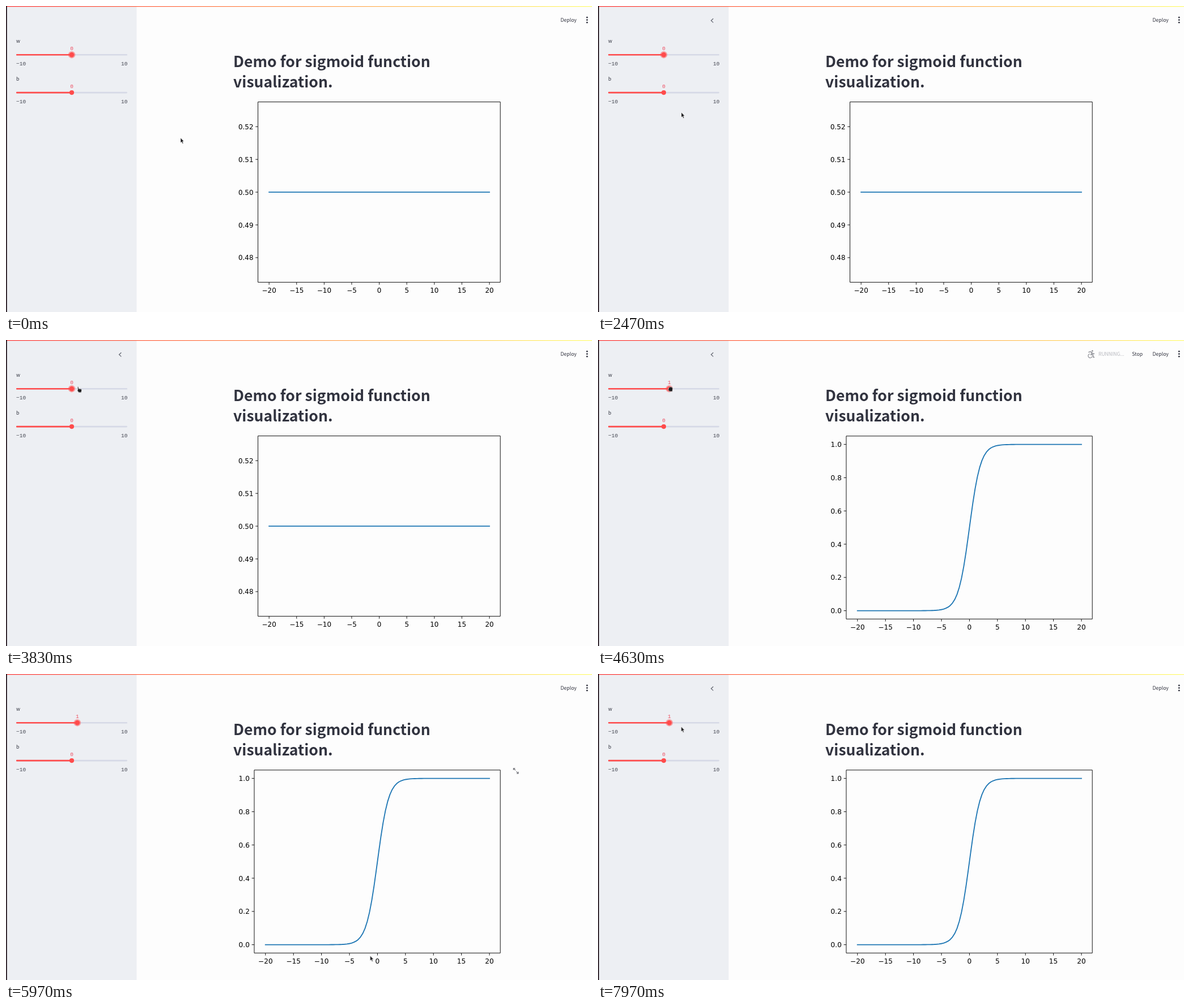
These frames come from a looping animation (1034 by 541 pixels, 8000 ms). An HTML page:

```html
<!DOCTYPE html>
<html lang="en">
<head>
<meta charset="utf-8">
<title>Sigmoid demo</title>
<style>
html, body { margin: 0; width: 100%; height: 100%; overflow: hidden; background: #fdfdfd; }
svg { display: block; width: 100%; height: 100%; }
.ui { font: 8.7px "Noto Sans CJK SC", "Noto Sans CJK JP", "Open Sans", sans-serif; fill: #31333f; }
.title { font-size: 26.6px; font-weight: 700; }
.mono { font: 9.5px "Liberation Mono", monospace; fill: #42444f; }
.value { fill: #ee4c60; text-anchor: middle; }
.plot { font: 12px "DejaVu Sans", sans-serif; fill: #000; }
.plot path { fill: none; stroke: #111; stroke-width: 1; }
.plot .curve { stroke: #1f77b4; stroke-width: 1.85; stroke-linecap: square; stroke-linejoin: round; }

.step, .move, .fade { animation: 8s linear infinite; }
.step { animation-timing-function: step-end; }
.w0 { animation-name: w0; }
.w1 { animation-name: w1; }
.bar { animation-name: bar; }
.thumb { animation-name: thumb; }
.flat { animation-name: flat; }
.sigmoid { animation-name: sigmoid; }
.running { animation-name: running; }
.chevron { animation-name: chevron; }
.arrow { animation-name: arrow; }
.hand { animation-name: hand; }
.grab { animation-name: grab; }
.expand { animation-name: expand; }
.pointer { animation-name: pointer; }

@keyframes w0 { 0% { opacity: 1 } 50.6%, 100% { opacity: 0 } }
@keyframes w1 { 0% { opacity: 0 } 50.6%, 100% { opacity: 1 } }
@keyframes bar { 0% { width: 98px } 50.6%, 100% { width: 107.8px } }
@keyframes thumb { 0% { transform: none } 50.6%, 100% { transform: translateX(9.8px) } }
@keyframes flat { 0% { opacity: 1 } 55.6%, 100% { opacity: 0 } }
@keyframes sigmoid { 0% { opacity: 0 } 55.6%, 100% { opacity: 1 } }
@keyframes running { 0% { opacity: 0 } 55% { opacity: 1 } 62%, 100% { opacity: 0 } }
@keyframes chevron { 0% { opacity: 0 } 26% { opacity: 1 } 66.5% { opacity: 0 } 82.3%, 100% { opacity: 1 } }
@keyframes arrow { 0% { opacity: 1 } 41% { opacity: 0 } 64.3%, 100% { opacity: 1 } }
@keyframes hand { 0% { opacity: 0 } 41% { opacity: 1 } 50.6%, 100% { opacity: 0 } }
@keyframes grab { 0% { opacity: 0 } 50.6% { opacity: 1 } 64.3%, 100% { opacity: 0 } }
@keyframes expand { 0%, 69.5% { opacity: 0 } 72.8%, 83.8% { opacity: 1 } 87%, 100% { opacity: 0 } }
@keyframes pointer {
  0%, 22% { transform: translate(308px, 233px); animation-timing-function: ease-in-out }
  30%, 32% { transform: translate(147px, 188px); animation-timing-function: ease-in-out }
  43%, 63.5% { transform: translate(127px, 82.5px); animation-timing-function: ease-in-out }
  72%, 78.5% { transform: translate(642.5px, 498px); animation-timing-function: ease-in-out }
  83.5% { transform: translate(158px, 122px); animation-timing-function: ease-out }
  90%, 100% { transform: translate(146.7px, 93px) }
}
</style>
</head>
<body>
<svg viewBox="0 0 1034 541">
  <defs>
    <linearGradient id="deco">
      <stop offset="0" stop-color="#ff4b4b"/>
      <stop offset="1" stop-color="#fffd80"/>
    </linearGradient>
  </defs>
  <rect width="1034" height="541" fill="#fdfdfd"/>
  <rect width="230.5" height="541" fill="#edeff3"/>
  <rect width="1034" height="1.4" fill="url(#deco)"/>
  <rect width="1.7" height="541" fill="#1c1018"/>

  <g class="ui">
    <text x="18" y="65">w</text>
    <text x="18" y="131.8">b</text>
    <text x="978.5" y="28">Deploy</text>
    <text class="title" x="401" y="107.5">Demo for sigmoid function</text>
    <text class="title" x="401" y="143.7">visualization.</text>
  </g>
  <g fill="#31333f">
    <circle cx="1025.3" cy="20.2" r="1.4"/>
    <circle cx="1025.3" cy="24.7" r="1.4"/>
    <circle cx="1025.3" cy="29.2" r="1.4"/>
  </g>
  <path class="step chevron" d="M203.4 22.2L199.6 25.8L203.4 29.4" fill="none" stroke="#666974" stroke-width="1.3"/>

  <g class="step running">
    <g fill="none" stroke="#8f9097" stroke-width="1.5" stroke-linecap="round" stroke-linejoin="round">
      <circle cx="872.3" cy="19.3" r="1.4" fill="#8f9097" stroke="none"/>
      <path d="M866 21.5L868.8 20.6L871.6 22.4L869.6 26H873.2L874 30.5H875.6M871.6 22.4L873 24.2H875.5"/>
      <path d="M867.3 24.6A3.6 3.6 0 1 0 871.9 29.2" stroke-width="1.2"/>
    </g>
    <g class="ui">
      <text x="883" y="28" style="font-size:8.5px;fill:#b5b6bc">RUNNING...</text>
      <text x="942.3" y="28">Stop</text>
    </g>
  </g>

  <g class="mono">
    <text x="18" y="105">−10</text>
    <text x="214.4" y="105" text-anchor="end">10</text>
    <text x="18" y="171.9">−10</text>
    <text x="214.4" y="171.9" text-anchor="end">10</text>
    <text class="value step w0" x="116" y="78.4">0</text>
    <text class="value step w1" x="125.8" y="78.4">1</text>
    <text class="value" x="116" y="145.3">0</text>
  </g>
  <g fill="#d6d9e6">
    <rect x="18" y="84.9" width="196" height="2.6" rx="1.3"/>
    <rect x="18" y="151.8" width="196" height="2.6" rx="1.3"/>
  </g>
  <g fill="#ff4b4b">
    <rect class="step bar" x="18" y="84.9" width="98" height="2.6" rx="1"/>
    <rect x="18" y="151.8" width="98" height="2.6" rx="1"/>
    <g class="step thumb">
      <circle cx="116" cy="86.2" r="6.2" opacity=".5"/>
      <circle cx="116" cy="86.2" r="4.2"/>
    </g>
    <circle cx="116" cy="153.1" r="4.1"/>
  </g>

  <g id="flat" class="plot step flat"></g>
  <g id="sigmoid" class="plot step sigmoid"></g>

  <path class="fade expand" d="M899 170.2L895.4 166.8M895.4 169.8V166.8H898.4M900.4 172.4L904 175.8M904 172.8V175.8H901" fill="none" stroke="#76777d" stroke-width="1.2"/>

  <g class="move pointer" fill="#1b1b1d" stroke="#fff" stroke-width=".6" stroke-linejoin="round">
    <path class="step arrow" d="M0 0V9L2 7.2L3.5 10.4L5 9.7L3.5 6.6H6.1Z"/>
    <path class="step hand" d="M-.8 .6Q0-.6 .9 .6L1.2 3.6L5.4 4.2Q6.8 4.5 6.6 6L5.8 10.2H1.4L-1.4 6.8Q-1.6 5.6-.2 6Z"/>
    <path class="step grab" d="M-2.4 2.4Q-1.6 .6-.3 .9Q.8-.4 1.8 .7Q3.2 .1 3.6 1.4Q5 1.3 4.9 3L4.3 8.4H-.9L-3.2 5.4Q-3.6 4-2.3 4.2Z"/>
  </g>
</svg>
<script>
const NS = "http://www.w3.org/2000/svg";

function add(parent, tag, attrs, text) {
  const el = document.createElementNS(NS, tag);
  for (const key in attrs) el.setAttribute(key, attrs[key]);
  if (text) el.textContent = text;
  parent.append(el);
}

function drawPlot(id, p, fn) {
  const g = document.getElementById(id);
  const x = v => p.x0 + (v + 20) / 40 * (853 - p.x0);
  const y = v => p.yBase + (v - p.yMin) / p.yStep * p.dy;
  g.style.fontSize = p.font + "px";

  let points = "";
  for (let i = 0; i < 100; i++) {
    const v = -20 + 40 * i / 99;
    points += (i ? "L" : "M") + x(v).toFixed(2) + " " + y(fn(v)).toFixed(2);
  }
  add(g, "path", { class: "curve", d: points });

  let frame = `M${p.left} ${p.top}H872.2V${p.bottom}H${p.left}Z`;
  for (let v = -20; v <= 20; v += 5) {
    frame += `M${x(v)} ${p.bottom}v4.3`;
    add(g, "text", { x: x(v), y: p.bottom + 18.2, "text-anchor": "middle" },
      String(v).replace("-", "−"));
  }
  for (let i = 0; i < p.rows; i++) {
    const v = p.yMin + i * p.yStep;
    frame += `M${p.left} ${y(v)}h-4.3`;
    add(g, "text", { x: p.left - 8.1, y: y(v) + 4.5, "text-anchor": "end" },
      v.toFixed(p.digits));
  }
  add(g, "path", { d: frame });
}

const sigmoid = w => v => 1 / (1 + Math.exp(-w * v));

drawPlot("flat", {
  left: 444.6, top: 169.6, bottom: 488.4, x0: 464.2, font: 11.96,
  yMin: 0.48, yStep: 0.01, rows: 5, yBase: 444.9, dy: -57.9, digits: 2
}, sigmoid(0));

drawPlot("sigmoid", {
  left: 438, top: 169.8, bottom: 493.3, x0: 457.8, font: 12.15,
  yMin: 0, yStep: 0.2, rows: 6, yBase: 478.6, dy: -58.8, digits: 1
}, sigmoid(1));
</script>
</body>
</html>
```
